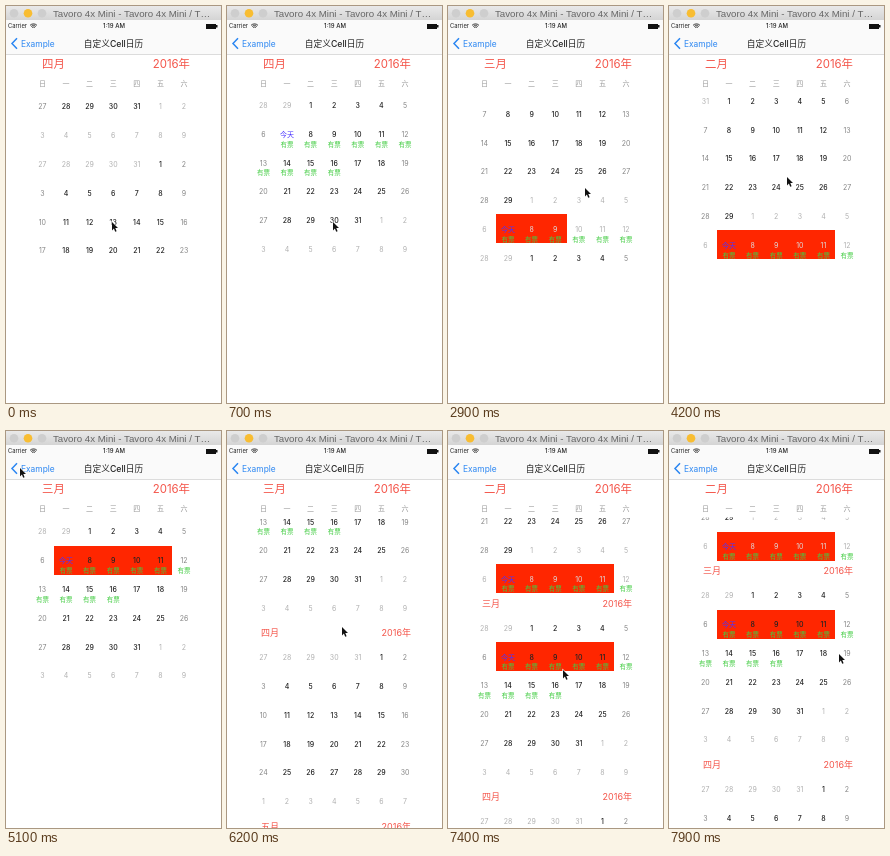
An HTML page with a canvas for the animation above (8 s loop, 215 by 397 pixels).

```html
<!DOCTYPE html>
<html lang="zh">
<head>
<meta charset="utf-8">
<title>自定义Cell日历</title>
<style>
html, body { margin: 0; width: 100%; height: 100%; overflow: hidden; background: #fff; }
canvas { display: block; width: 215px; height: 397px; }
</style>
</head>
<body>
<canvas id="stage"></canvas>
<script>
const W = 215, H = 397, LOOP = 8000;
const ROW = 28.8, COL = 23.6, LEFT = 24.6, GRID_TOP = 86.5, SECTION_HEADER = 20.5;
const LIST_START = 5400, TRAVEL = 200;
const WEEK = '日一二三四五六';
const INK = '#222', HEADING = '#f4554a', BLUE = '#2a86f2';
const FAMILY = 'Inter, "Noto Sans CJK SC", "Noto Sans CJK JP", sans-serif';
const ARROW = new Path2D('M0 0V8.4L1.9 6.6L3.2 9.8L4.6 9.2L3.3 6.1H6Z');

const canvas = document.getElementById('stage');
const ctx = canvas.getContext('2d');
const ratio = window.devicePixelRatio || 1;
canvas.width = W * ratio;
canvas.height = H * ratio;

const span = (t, from, to) => Math.min(1, Math.max(0, (t - from) / (to - from)));
const easeOut = p => 1 - (1 - p) ** 3;
const easeInOut = p => p < .5 ? 4 * p ** 3 : 1 - 4 * (1 - p) ** 3;
const smooth = p => p * p * (3 - 2 * p);

// Top of the March block: paged swipes first, then free scrolling of the list
function marchTop(t) {
  if (t < LIST_START) {
    const toMarch = easeOut(span(t, 50, 900));
    const toFebruary = easeOut(span(t, 2300, 3500)) - easeInOut(span(t, 4050, 4800));
    return GRID_TOP + 4 * ROW * (toMarch - 1) + 6 * ROW * toFebruary;
  }
  return GRID_TOP - 88 * smooth(span(t, LIST_START, 6200))
    + 179 * smooth(span(t, 6200, 6900)) - 47.5 * smooth(span(t, 7100, 7900));
}

// Pointer stops: arrival time, x, y; each trip takes TRAVEL ms
const stops = [
  [0, 106, 216], [900, 91, 188], [1300, 60, 130], [1600, 91, 131], [2200, 106, 131],
  [2800, 137, 182], [3500, 151, 243], [4200, 118, 171], [5100, 14, 37],
  [5600, 115, 235], [6200, 115, 196], [6900, 115, 239], [7900, 170, 223]
];

function pointer(t) {
  let [, x, y] = stops[0];
  for (const [arrival, toX, toY] of stops.slice(1)) {
    const p = smooth(span(t, arrival - TRAVEL, arrival));
    x += (toX - x) * p;
    y += (toY - y) * p;
  }
  return [x, y];
}

function text(str, x, y, size, color, align = 'center', weight = 400, family = FAMILY) {
  ctx.font = `${weight} ${size}px ${family}`;
  ctx.fillStyle = color;
  ctx.textAlign = align;
  ctx.fillText(str, x, y + size * .36);
}

function rect(x, y, w, h, color) {
  ctx.fillStyle = color;
  ctx.fillRect(x, y, w, h);
}

function drawChrome() {
  const bar = ctx.createLinearGradient(0, 0, 0, 14);
  bar.addColorStop(0, '#e9e9e9');
  bar.addColorStop(1, '#d4d4d4');
  rect(0, 0, W, 14, bar);
  for (let i = 0; i < 3; i++) {
    ctx.fillStyle = i === 1 ? '#f8bd32' : '#cecece';
    ctx.beginPath();
    ctx.arc(8 + 14 * i, 7.3, 4.3, 0, 7);
    ctx.fill();
  }
  text('Tavoro 4x Mini - Tavoro 4x Mini / T…', 47, 7.5, 9.7, '#666', 'left', 400,
    '"Liberation Sans", sans-serif');

  rect(0, 14, W, 35, '#fafafa');
  rect(0, 48, W, 1, '#dcdcdc');
  text('Carrier', 2, 20.3, 5.8, INK, 'left');
  text('1:19 AM', 108, 20.3, 6, INK, 'center', 500);

  ctx.strokeStyle = INK;
  ctx.lineWidth = .9;
  for (let r = 1.7; r < 5; r += 1.6) {
    ctx.beginPath();
    ctx.arc(27.5, 22.8, r, -Math.PI * .75, -Math.PI * .25);
    ctx.stroke();
  }
  rect(200, 18, 10, 5, '#111');
  rect(210, 19, 1.5, 2.5, '#111');

  ctx.strokeStyle = BLUE;
  ctx.lineWidth = 1.5;
  ctx.stroke(new Path2D('M11 32.3L6 37.5L11 42.7'));
  text('Example', 15, 37.5, 8.4, BLUE, 'left');
  text('自定义Cell日历', 107.5, 37.5, 8.7, INK, 'center', 500);
}

function heading(month, left, y, size) {
  text(WEEK[month] + '月', left, y, size, HEADING, 'left');
  text('2016年', 184, y, size, HEADING, 'right');
}

function drawDay(month, index, x, y, lastSelected) {
  const first = new Date(2016, month - 1, 1).getDay();
  const date = new Date(2016, month - 1, 1 - first + index);
  const day = date.getDate();
  const isMarch = date.getMonth() === 2;
  const inMonth = date.getMonth() === month - 1;
  const weekend = date.getDay() % 6 === 0;
  const today = isMarch && day === 7;
  const selected = isMarch && day >= 7 && day <= lastSelected;

  if (selected) {
    const left = Math.round(x - COL / 2);
    const top = Math.round(y - ROW / 2 - .6);
    rect(left, top, Math.round(x + COL / 2) - left, Math.round(ROW), '#ff2600');
  }
  const color = today ? '#4a35ff' : !inMonth ? (selected ? '#ddd' : '#b0b0b0')
    : weekend ? '#858585' : INK;
  text(today ? '今天' : day, x, y, 7, color, 'center', inMonth && !weekend ? 500 : 400);
  if (isMarch && day >= 7 && day <= 16) text('有票', x, y + 10, 6.5, '#42cc42');
}

function drawCalendar(t) {
  const listMode = t >= LIST_START;
  const header = listMode ? SECTION_HEADER : 0;
  const block = 6 * ROW + header;
  const march = marchTop(t);
  const bottom = listMode ? H : GRID_TOP + 6 * ROW;
  const lastSelected = t < 1500 ? 0 : t < 2200 ? 7 : t < 3700 ? 9 : 11;

  ctx.save();
  ctx.beginPath();
  ctx.rect(0, GRID_TOP, W, bottom - GRID_TOP);
  ctx.clip();
  for (let month = 2; month <= 5; month++) {
    const top = march + (month - 3) * block;
    if (listMode) heading(month, 34, top + header / 2, 9);
    for (let i = 0; i < 42; i++) {
      const x = LEFT + COL * (i % 7 + .5);
      const y = top + header + ROW * (Math.floor(i / 7) + .5);
      drawDay(month, i, x, y, lastSelected);
    }
  }
  ctx.restore();

  // The paged title changes once a swipe has settled
  const pagedMonth = t < 1000 ? 4 : t >= 3450 && t < 4800 ? 2 : 3;
  heading(listMode ? (march > GRID_TOP ? 2 : 3) : pagedMonth, 36, 58.3, 11.4);
  [...WEEK].forEach((name, i) => text(name, LEFT + COL * (i + .5), 77, 7, '#999'));
}

function drawPointer(x, y) {
  ctx.save();
  ctx.translate(x, y);
  ctx.strokeStyle = '#fff';
  ctx.lineWidth = 1.2;
  ctx.stroke(ARROW);
  ctx.fillStyle = '#111';
  ctx.fill(ARROW);
  ctx.restore();
}

const start = performance.now();
function frame() {
  const t = (performance.now() - start) % LOOP;
  ctx.setTransform(ratio, 0, 0, ratio, 0, 0);
  rect(0, 0, W, H, '#fff');
  drawCalendar(t);
  drawChrome();
  drawPointer(...pointer(t));
  requestAnimationFrame(frame);
}
frame();
</script>
</body>
</html>
```
